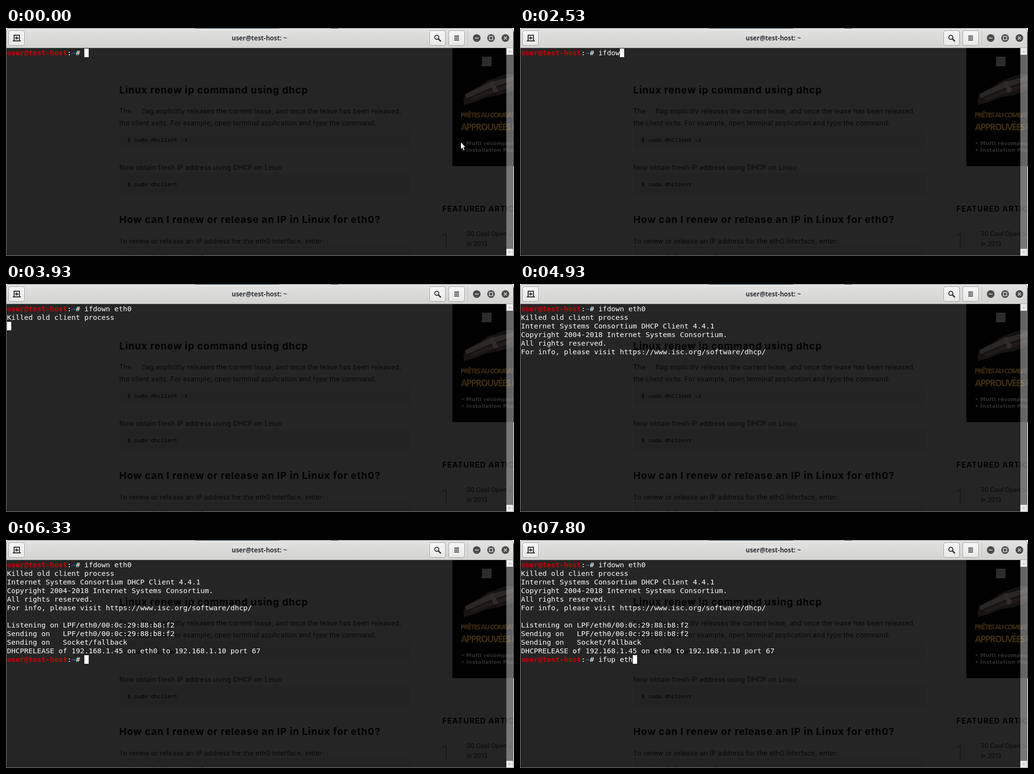
An HTML page for the animation above (8 s loop, 1063 by 477 pixels).

```html
<!DOCTYPE html>
<html lang="en">
<head>
<meta charset="utf-8">
<title>Terminal</title>
<style>
  html, body { margin: 0; width: 100%; height: 100%; overflow: hidden; background: #252525; }
  svg { position: absolute; left: 0; top: 0; display: block; }
  .page text { font-family: Inter, sans-serif; fill: #080808; white-space: pre; }
  .page .h { font-size: 20.5px; font-weight: 700; letter-spacing: .9px; fill: #020202; }
  .page .p { font-size: 14px; letter-spacing: .22px; }
  .page .code { font: 11.67px "Noto Sans Mono", monospace; fill: #000; }
  .page .flag { fill: #5c0a14; }
  .page .ad { font-family: "Open Sans", sans-serif; font-weight: 700; fill: #3c2c0c; }
  .page .note { font: bold 11px "DejaVu Sans", sans-serif; letter-spacing: .2px; fill: #2e2e2e; }
  .title { font: bold 13.3px "Noto Sans", sans-serif; fill: #303436; text-anchor: middle; }
  #screen, #caret { position: absolute; margin: 0; }
  #screen { left: 2px; top: 43px; font: 14.95px/18px "DejaVu Sans Mono", monospace; color: #fff; white-space: pre; }
  #screen b { color: #c00; }
  #screen i { color: #3465a4; font-style: normal; font-weight: 700; }
  #caret { width: 9px; height: 18px; background: #fff; }
</style>
</head>
<body>
<svg width="1063" height="477" viewBox="0 0 1063 477">
  <defs>
    <linearGradient id="bar" x2="0" y2="1">
      <stop stop-color="#e3e3e2"/><stop offset="1" stop-color="#d3d3d2"/>
    </linearGradient>
    <linearGradient id="button" x2="0" y2="1">
      <stop stop-color="#f7f7f7"/><stop offset="1" stop-color="#e9e9e8"/>
    </linearGradient>
  </defs>

  <g class="page">
    <rect width="1063" height="477" fill="#252525"/>
    <path d="M212.5 42V477M868.5 42V477" stroke="#222"/>
    <g fill="#232323">
      <rect x="237" y="211" width="610" height="45" rx="4"/>
      <rect x="237" y="304" width="610" height="44" rx="4"/>
      <rect x="237" y="457" width="610" height="44" rx="4"/>
    </g>
    <text class="h" x="237" y="137">Linux renew ip command using dhcp</text>
    <text class="p" x="237" y="179">The</text>
    <text class="code flag" x="266" y="178">-r</text>
    <text class="p" x="284" y="179">flag explicitly releases the current lease, and once the lease has been released,</text>
    <text class="p" x="237" y="204">the client exits. For example, open terminal application and type the command:</text>
    <text class="code" x="254" y="238">$ sudo dhclient -r</text>
    <text class="p" x="237" y="297">Now obtain fresh IP address using DHCP on Linux:</text>
    <text class="code" x="254" y="331">$ sudo dhclient</text>
    <text class="h" x="237" y="408">How can I renew or release an IP in Linux for eth0?</text>
    <text class="p" x="237" y="451">To renew or release an IP address for the eth0 interface, enter:</text>
    <text class="code" x="254" y="483">$ sudo dhclient -r eth0</text>

    <rect x="934" y="42" width="129" height="247" fill="#000"/>
    <rect x="996" y="60" width="20" height="20" fill="#2c2c2c"/>
    <path d="M957 152l3-13 28-16 22-14 37-13h16v34l-32 11-26 4-24 10-22 6z" fill="#141312"/>
    <path d="M961 139l48-24 54-15v9l-50 17-49 21z" fill="#2a2725"/>
    <path d="M970 148l34-16 59-18v8l-54 18-34 12z" fill="#221a17"/>
    <path d="M1012 113l8-3 10 22-9 4z" fill="#2f2b29"/>
    <text class="ad" x="951" y="187" font-size="14.5" letter-spacing="-1.8">PRÊTES AU COMBAT</text>
    <text class="ad" x="952" y="214" font-size="19" letter-spacing="-2">APPROUVÉES PAR</text>
    <text class="note" x="952" y="245">•</text>
    <text class="note" x="963" y="245">Multi récompensée</text>
    <text class="note" x="952" y="259">•</text>
    <text class="note" x="963" y="259">Installation Plug</text>

    <text x="913" y="384" font-size="15.5" font-weight="700" letter-spacing="1.3" style="fill:#020202">FEATURED ARTICLES</text>
    <text x="911" y="458" font-size="40" font-weight="200" style="fill:#161616">1</text>
    <text x="964" y="435" font-size="12.8">30 Cool Open Source</text>
    <text x="964" y="456" font-size="12.8">in 2013</text>
  </g>

  <g>
    <rect x="1047" y="42" width="14" height="434" fill="#c8c8c8" opacity=".5"/>
    <path d="M1047 42h14v14h-14zM1047 462h14v14h-14z" fill="#ececec"/>
    <path d="M1050 51l4-4 4 4zM1050 467l4 4 4-4z" fill="#c9c9c9"/>
  </g>

  <g>
    <path d="M0 0H8V8H0ZM1055 0H1063V8H1055ZM1062 289H1063V477H1062Z" fill="#fff"/>
    <path d="M0 42V7Q0 0 7 0H1055Q1062 0 1062 7V42Z" fill="url(#bar)"/>
    <path d="M.5 477V7Q.5 .5 7 .5H1055Q1061.5 .5 1061.5 7V477M0 476.5H1062" fill="none" stroke="#858585"/>
    <path d="M395 .5H572M679 .5H695" stroke="#0b2436"/>
    <path d="M1 41.5H1061" stroke="#a9a9a8"/>
    <text class="title" x="530" y="26">user@test-host: ~</text>
    <g fill="url(#button)" stroke="#a2a2a1">
      <rect x="5.5" y="5.5" width="33" height="31" rx="3.5"/>
      <rect x="886.5" y="5.5" width="33" height="31" rx="3.5"/>
      <rect x="926.5" y="5.5" width="33" height="31" rx="3.5"/>
    </g>
    <path d="M966.5 6V37" stroke="#c2c2c1"/>
    <g fill="none" stroke="#2a2d2e" stroke-width="2">
      <path d="M17 27V15H28V27M14 27H31M19 21H26M22.5 17.5V24.5"/>
      <circle cx="901.5" cy="19.5" r="4.2"/>
      <path d="M904.5 22.5L910 28" stroke-width="2.6"/>
      <path d="M938 17H948M938 21H948M938 25H948"/>
    </g>
    <g fill="#4b4b4b">
      <circle cx="985" cy="21" r="8"/>
      <circle cx="1015" cy="21" r="8"/>
      <circle cx="1045" cy="21" r="8"/>
    </g>
    <path d="M981 21H989M1011.5 17.5H1018.5V24.5H1011.5ZM1042 18L1048 24M1048 18L1042 24" fill="none" stroke="#e2e2e1" stroke-width="1.6"/>
  </g>
</svg>

<div id="screen"></div>
<div id="caret"></div>

<svg width="1063" height="477" viewBox="0 0 1063 477">
  <path id="arrow" d="M.5 .5V16L4 12.7 6.5 18.5 9 17.4 6.5 11.7H11Z" fill="#fff" stroke="#000" stroke-width=".8"/>
  <path id="beam" d="M937 218.5H941M939 218V227M937 226.5H941" stroke="#ddd"/>
</svg>

<script>
const LOOP = 8000;
const PROMPT = '<b>user@test-host</b>:<i>~</i># ';
const PROMPT_COLS = 18;
const down = { text: 'ifdown eth0', keys: [1530, 1600, 1930, 2330, 2530, 2670, 2730, 3130, 3270, 3400, 3800] };
const up = { text: 'ifup eth', keys: [6470, 6600, 7000, 7070, 7400, 7600, 7670, 7800] };
const output = [
  [3930, ['Killed old client process']],
  [4930, [
    'Internet Systems Consortium DHCP Client 4.4.1',
    'Copyright 2004-2018 Internet Systems Consortium.',
    'All rights reserved.',
    'For info, please visit https://www.isc.org/software/dhcp/']],
  [5000, [
    '',
    'Listening on LPF/eth0/00:0c:29:88:b8:f2',
    'Sending on   LPF/eth0/00:0c:29:88:b8:f2',
    'Sending on   Socket/fallback',
    'DHCPRELEASE of 192.168.1.45 on eth0 to 192.168.1.10 port 67']]
];
const caretOff = [[4530, 5130], [5730, 6330]];

const [screenBox, caret, arrow, beam] = ['screen', 'caret', 'arrow', 'beam'].map(id => document.getElementById(id));
const typed = ({ text, keys }, t) => text.slice(0, keys.filter(k => k <= t).length);
const show = (el, on) => { el.style.visibility = on ? 'visible' : 'hidden'; };
let shown = '';

function draw(t) {
  const first = typed(down, t);
  const lines = [PROMPT + first];
  for (const [at, rows] of output) if (t >= at) lines.push(...rows);

  let row = 0, col = PROMPT_COLS + first.length;
  if (t >= 5000) {
    const second = typed(up, t);
    row = lines.length;
    col = PROMPT_COLS + second.length;
    lines.push(PROMPT + second);
  } else if (t >= 3930) {
    row = lines.length;
    col = 0;
  }

  const html = lines.join('\n');
  if (html !== shown) screenBox.innerHTML = shown = html;
  caret.style.left = 2 + 9 * col + 'px';
  caret.style.top = 43 + 18 * row + 'px';
  show(caret, !caretOff.some(([a, b]) => t >= a && t < b));

  arrow.setAttribute('transform', t < 70 ? 'translate(951 238)' : 'translate(944 228)');
  show(arrow, t < 200);
  show(beam, t >= 200 && t < 1470);
}

function tick() {
  draw(performance.now() % LOOP);
  requestAnimationFrame(tick);
}
tick();
</script>
</body>
</html>
```
